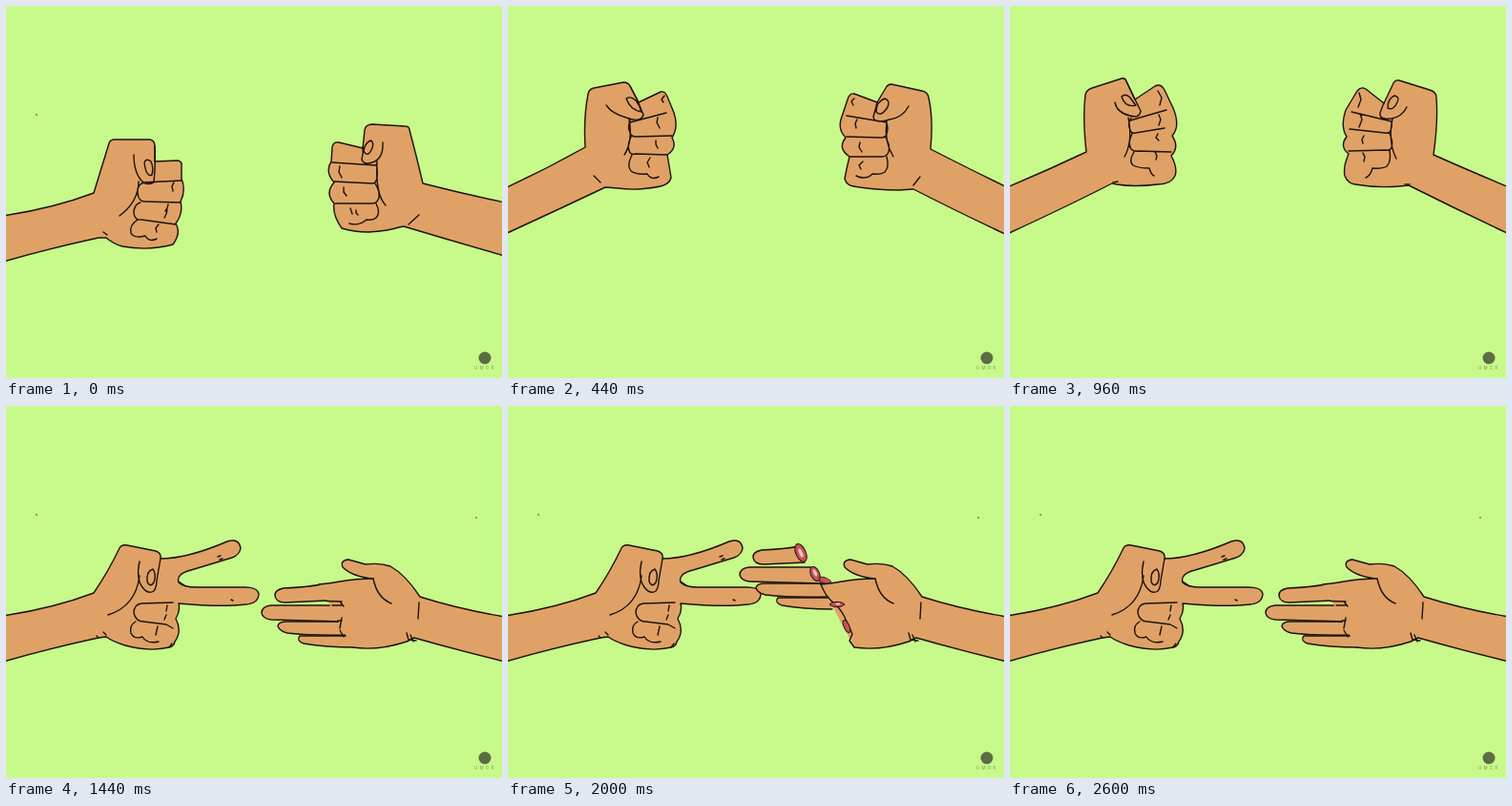
An HTML page that plays this animation: 520x390 px, repeating every 2640 ms.

```html
<!DOCTYPE html>
<html lang="en">
<head>
<meta charset="utf-8">
<title>Rock paper scissors</title>
<style>
  html, body { margin: 0; width: 100%; height: 100%; overflow: hidden; background: #c7f98b; }
  svg { display: block; width: 520px; height: 390px; }
  .skin { fill: #e0a167; }
  .line { fill: none; }
  .hand { stroke: #1b1308; stroke-width: 1.4; stroke-linecap: round; stroke-linejoin: round; }
  .flesh { fill: #c9505a; stroke-width: 1; }
  .bone { fill: #f3c9b8; stroke: none; }
  text { font: 4.5px Inter, sans-serif; letter-spacing: 2.2px; fill: #7d985a; }
</style>
</head>
<body>
<svg viewBox="0 0 520 390">
  <rect width="520" height="390" fill="#c7f98b"/>
  <circle id="speckLeft" cx="32" cy="114" r=".8" fill="#31401f"/>

  <g id="fists" class="hand">
    <path id="leftShape" class="skin"/><path id="leftLines" class="line"/>
    <path id="rightShape" class="skin"/><path id="rightLines" class="line"/>
  </g>

  <g id="reveal" class="hand">
    <circle cx="493" cy="117" r=".8" fill="#31401f" stroke="none"/>
    <!-- scissors -->
    <path class="skin" d="M-3 220Q50 212 92 196Q107 174 119 149Q121 145 127 146L157 152Q163 154 162 160Q190 160 232 142Q244 138 246 149Q245 156 237 159L194 172Q178 176 181 185Q186 190 200 190L250 190Q265 190 265 198Q264 207 252 208Q225 211 181 207Q183 215 178 223Q185 236 177 247Q176 252 171 253Q150 258 125 251Q112 247 105 242L97 243Q50 253 -3 268"/>
    <path class="line" d="M140 163Q136 181 143 190Q149 198 155 194Q158 190 158 183L162 160M148 184Q147 173 154 171Q158 176 155 185Q151 191 148 184ZM140 178Q136 210 107 219M175 206L142 207Q134 208 134 217Q136 226 144 226L168 229L175 233M136 226Q129 230 131 238Q134 245 143 242Q148 250 160 247M181 184L187 188M169 209L168 215M168 219L166 224M159 231L157 240M222 158L225 157M224 161L227 160M236 203L238 204M102 237L105 240M95 241L97 243M171 253L174 249"/>
    <!-- paper -->
    <g id="fingers" class="skin">
      <path d="M361 241L308 241Q304 246 312 249Q335 253 365 253"/>
      <path d="M354 226L295 226Q285 226 285 231Q287 236 295 238Q320 241 360 240"/>
      <path d="M343 209L278 209Q268 210 268 217Q269 223 278 224L353 226"/>
      <path d="M331 187Q315 190 291 191Q281 193 282 199Q283 206 293 206L336 204"/>
      <g class="wound">
        <ellipse class="flesh" cx="357" cy="223" rx="7" ry="3" transform="rotate(20 357 223)"/>
        <ellipse class="flesh" cx="347" cy="216" rx="4.5" ry="8" transform="rotate(-24 347 216)"/>
        <ellipse class="bone" cx="347" cy="215" rx="1.6" ry="4" transform="rotate(-24 347 215)"/>
        <ellipse class="flesh" cx="332" cy="194" rx="5.2" ry="10" transform="rotate(-24 332 194)"/>
        <ellipse class="bone" cx="332" cy="194" rx="1.8" ry="5" transform="rotate(-24 332 194)"/>
      </g>
    </g>
    <path class="skin" d="M328 187Q340 186 350 184Q366 181 385 181Q363 179 353 169Q350 162 359 161L377 166Q392 164 403 168Q419 177 434 200Q475 213 523 221L523 268Q470 255 428 243L420 247Q390 257 363 253"/>
    <path class="line" d="M385 181Q389 201 404 207M433 206L432 223M420 238L422 245L430 246M424 240L427 247"/>
    <path id="creases" class="line" d="M336 204.5L352 205M342 209L352 209M352 225L348 225M350 205L354 210M352 222L350 233M350 235L354 242"/>
    <g class="wound">
      <path class="line" d="M328 187Q333 200 342 207Q351 215 355 226L361 239L358 246L363 253"/>
      <ellipse class="flesh" cx="345" cy="208" rx="7.5" ry="2.6"/>
      <ellipse class="bone" cx="346" cy="207.5" rx="2.5" ry="1"/>
      <ellipse class="flesh" cx="355" cy="231" rx="2.8" ry="7" transform="rotate(-24 355 231)"/>
    </g>
  </g>

  <circle cx="502" cy="369" r="6.5" fill="#5b6d43"/>
  <text x="491" y="381">UMOK</text>
</svg>
<script>
const LOOP = 2640, STEP = 40, REVEAL = 1160, CUT = 1560;
const $ = id => document.getElementById(id);
const wounds = document.querySelectorAll('.wound');

// Every pose shares one command layout, so poses can be blended number by number.
const left = {
  low: {
    shape: 'M-3 220Q50 212 92 196Q100 170 108 144Q109 140 114 140L151 140Q156 141 156 147L156 163L180 162Q185 163 184 168L184 181Q189 193 183 205Q186 217 178 228Q184 238 175 250Q150 257 122 252Q112 249 105 243L97 243Q50 253 -3 268',
    lines: 'M134 156Q134 176 144 185Q150 188 155 185Q157 165 156 147M145 164Q147 159 152 163Q155 170 153 177Q147 180 145 164ZM139 184Q139 205 119 220M144 185L184 183M145 185Q137 187 138 196Q139 205 145 205L183 206M141 206Q134 208 134 217Q135 225 142 224L178 229M138 224Q129 230 131 238Q134 244 146 241Q150 248 158 244M176 185L174 189L175 194M170 208L169 212L167 215M169 214L168 218L166 222M160 229L157 233L158 237M102 237L106 240'
  },
  first: {
    shape: 'M-3 191Q40 171 81 148Q79 118 84 92Q85 87 90 86L121 80Q126 80 128 84L137 101L160 90Q165 89 167 95L174 112Q179 127 172 138Q178 149 167 156Q169 168 171 180Q169 187 160 189Q135 194 115 191L102 190Q60 210 -3 239',
    lines: 'M103 104Q109 113 124 117Q139 123 142 114Q136 98 128 84M124 97Q128 94 134 99Q138 104 140 111Q128 109 124 97ZM127 119Q131 142 122 156M128 122L166 112M128 120Q125 127 128 133Q129 137 134 137L172 136M129 137Q124 147 128 154Q130 156 134 155L167 156M130 156Q124 168 129 173Q134 177 146 176Q150 183 158 179M164 94L161 98L163 101M157 117L156 122L159 128M155 141L155 145L157 149M149 159L146 164L148 169M90 178L97 185'
  },
  second: {
    shape: 'M-3 190Q40 172 80 153Q76 118 79 93Q80 88 86 86L117 76Q121 75 122 79L131 98L152 84Q158 81 162 88L171 107Q179 126 170 136Q178 148 169 157Q176 170 173 178Q169 187 155 187Q130 190 112 187L107 186Q60 210 -3 239',
    lines: 'M110 101Q112 112 126 115Q136 118 137 110Q130 96 122 79M117 95Q121 91 126 96Q130 102 132 104Q121 107 117 95ZM124 117Q129 142 120 158M126 120L164 109M127 117Q123 124 126 130Q127 134 132 133L162 128M128 134Q123 144 127 150Q130 153 134 152L169 153M130 153Q124 163 129 167Q134 170 146 170Q148 177 151 178M155 89L159 96L157 104M156 114L158 119L156 125M155 134L153 138L156 141M152 153L154 157L153 161M108 185L113 184'
  }
};
const right = {
  low: {
    shape: 'M523 206Q480 197 437 186Q430 156 423 130Q423 126 418 126L384 124Q377 124 376 130L374 149L349 143Q343 142 342 148L341 163Q334 174 344 185Q334 196 344 207Q342 219 352 233Q365 237 380 237Q400 236 412 232L417 231Q470 247 523 262',
    lines: 'M395 143Q396 160 384 164Q375 167 373 161Q375 154 374 148M384 149Q386 142 382 141Q376 144 375 152Q379 160 384 149ZM389 163Q387 197 398 209M387 167L342 164M388 166Q390 172 389 180Q388 186 384 186L344 184M387 186Q392 194 391 201Q389 207 384 207L345 207M388 207Q393 217 388 222Q385 225 378 224Q370 231 360 228M350 168L349 174L352 180M354 190L354 195L357 199M361 212L362 215L363 218M367 214L367 217L369 219M433 219L422 229'
  },
  first: {
    shape: 'M523 190Q480 169 443 150Q446 118 441 96Q440 90 434 89L402 82Q398 82 396 86L387 101L363 92Q358 91 356 98L349 119Q346 130 354 138Q345 149 358 158Q355 170 353 181Q355 188 362 189Q385 193 410 193L425 192Q470 215 523 240',
    lines: 'M420 105Q414 117 400 119Q384 124 383 116Q386 106 387 101M398 106Q401 99 395 97Q386 100 386 111Q391 117 398 106ZM397 121Q394 142 404 158M397 122L355 115M397 123Q399 128 397 134Q396 138 391 138L355 137M396 138Q401 146 399 153Q397 158 392 158L358 158M397 158Q400 169 395 174Q391 177 382 176Q375 183 365 178M363 97L360 100L362 104M366 119L364 123L365 128M369 143L368 148L371 153M372 163L368 167L370 171M432 179L425 188'
  },
  second: {
    shape: 'M523 190Q480 172 444 156Q449 120 447 96Q447 90 440 88L408 78Q403 77 401 83L392 102L373 87Q368 84 364 89L352 109Q346 126 353 137Q345 147 355 155Q349 169 351 178Q354 186 362 187Q385 191 408 189L418 188Q470 214 523 239',
    lines: 'M416 106Q411 116 400 118Q387 120 388 112Q390 106 392 102M406 101Q409 95 403 94Q396 97 396 107Q402 110 406 101ZM401 118Q396 142 405 160M400 121L358 111M400 121Q401 126 399 131Q397 134 393 133L356 129M398 134Q402 142 400 148Q399 152 394 151L355 152M398 152Q400 163 395 168Q390 171 380 170Q378 178 373 180M366 91L368 98L365 106M367 113L369 119L366 127M371 136L369 140L370 144M370 154L372 158L371 163M414 187L419 187'
  }
};

const NUMBER = /-?\d+(\.\d+)?/g;
function blend(from, to, k) {
  const ends = to.match(NUMBER);
  let i = 0;
  return from.replace(NUMBER, n => (+n + (ends[i++] - n) * k).toFixed(1));
}

const clamp = x => Math.max(0, Math.min(1, x));
const smooth = x => x * x * (3 - 2 * x);

// Slow rise, short hold, accelerating drop.
function lift(t, riseFrom, top, dropFrom) {
  const drop = clamp((t - dropFrom) / 160);
  return smooth(clamp((t - riseFrom) / (top - riseFrom))) * (1 - drop * drop);
}

function drawFist(side, poses, high, k) {
  $(side + 'Shape').setAttribute('d', blend(poses.low.shape, poses[high].shape, k));
  $(side + 'Lines').setAttribute('d', blend(poses.low.lines, poses[high].lines, k));
}

function show(node, on) { node.style.display = on ? '' : 'none'; }

function draw(ms) {
  const t = Math.floor((ms % LOOP) / STEP) * STEP;
  const revealed = t >= REVEAL, cut = t >= CUT && t < 2600;
  show($('fists'), !revealed);
  show($('reveal'), revealed);
  show($('speckLeft'), revealed || t < 80);

  if (!revealed) {
    const high = t < 640 ? 'first' : 'second';
    const k = t < 640 ? lift(t, 40, 440, 480) : lift(t, 680, 960, 1000);
    drawFist('left', left, high, k);
    drawFist('right', right, high, k);
    return;
  }

  // Severed fingers drift up and left, then fall back into place.
  const x = (t - 2140) / (t < 2140 ? 620 : 460);
  const slide = cut ? 1 - Math.abs(x) ** 3 : 0;
  $('fingers').setAttribute('transform', `translate(${-25.4 * slide ** 1.3} ${-40.5 * slide})`);
  wounds.forEach(w => show(w, cut));
  show($('creases'), !cut);
}

const start = performance.now();
function tick() {
  draw(performance.now() - start);
  requestAnimationFrame(tick);
}
tick();
</script>
</body>
</html>
```
